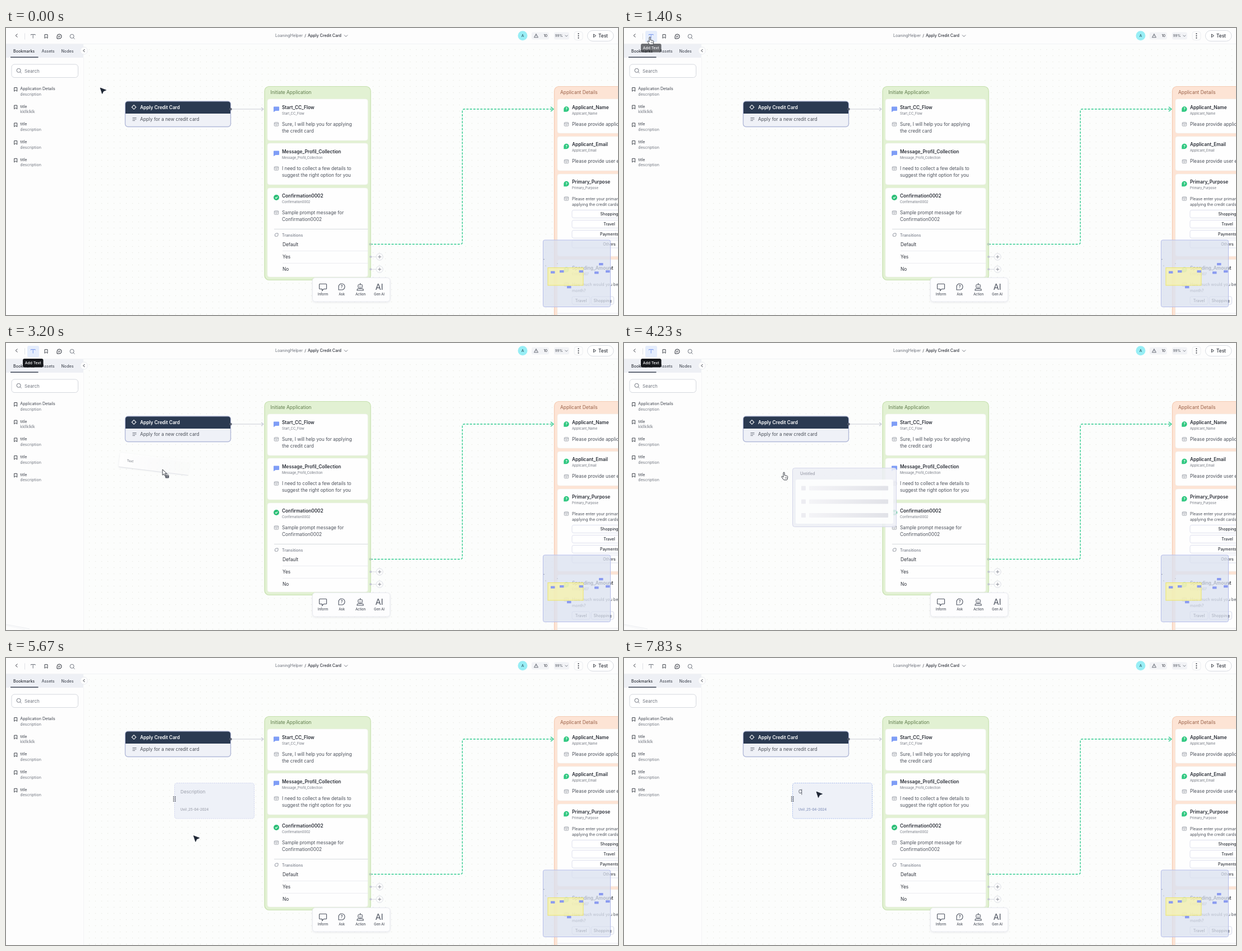
An HTML page for the animation above (8000 ms loop, 1091 by 513 pixels).

```html
<!DOCTYPE html>
<html lang="en">
<head>
<meta charset="utf-8">
<title>Flow builder</title>
<style>
  html, body { margin: 0; width: 100%; height: 100%; overflow: hidden; background: #fcfdfc; }
  svg { display: block; width: 100vw; height: 100vh; font-family: Inter, Roboto, sans-serif; }
  text { white-space: pre; }
</style>
</head>
<body>
<svg id="stage" viewBox="0 0 1091 513" fill="none"></svg>
<script>
const LOOP = 8000;
const stage = document.getElementById('stage');
const INK = '#2b2f38', BODY = '#4b505a', SOFT = '#70757f';

// Markup helpers; text is placed by the middle of its capitals.
const txt = (x, y, s, size = 8.25, fill = BODY, weight = 400, anchor = 'start') =>
  `<text x="${x}" y="${y + size * 0.36}" font-size="${size}" fill="${fill}" font-weight="${weight}" text-anchor="${anchor}">${s}</text>`;
const box = (x, y, w, h, r, fill, stroke = 'none', extra = '') =>
  `<rect x="${x}" y="${y}" width="${w}" height="${h}" rx="${r}" fill="${fill}" stroke="${stroke}" ${extra}/>`;
const line = (d, stroke = INK, width = 1, extra = '') =>
  `<path d="${d}" stroke="${stroke}" stroke-width="${width}" ${extra}/>`;
const dot = (x, y, r, fill, stroke = 'none') =>
  `<circle cx="${x}" cy="${y}" r="${r}" fill="${fill}" stroke="${stroke}"/>`;
const at = (x, y, s) => `<g transform="translate(${x} ${y})">${s}</g>`;
const group = (id, s) => `<g id="${id}">${s}</g>`;

const bookmark = (x, y) => line(`M${x - 2.5} ${y - 3.3}h5v6.6l-2.5 -2l-2.5 2z`, INK, 0.9, 'stroke-linejoin="round"');
const lens = (x, y) => line(`M${x + 2.2} ${y + 2.2}l2.3 2.3`, SOFT) +
  `<circle cx="${x - 0.4}" cy="${y - 0.4}" r="3.5" stroke="${SOFT}"/>`;
const bubble = (x, y, c, fill = 'none') =>
  `<path d="M${x - 4} ${y + 4}v-4a4 4 0 1 1 4 4z" stroke="${c}" fill="${fill}" stroke-linejoin="round"/>`;
const promptIcon = (x, y) => box(x - 3.7, y - 3.2, 7.4, 6.4, 1, 'none', '#8d929c', 'stroke-width=".8"') +
  line(`M${x - 3.7} ${y - 1.2}h7.4M${x - 2} ${y + 1}h4`, '#8d929c', 0.8);
const messageIcon = (x, y) =>
  `<path d="M${x - 4} ${y - 4.5}h8q1 0 1 1v5.5q0 1-1 1h-5.5l-3.5 2.2v-9q0-.7 1-.7z" fill="#7f9df6"/>`;
const askIcon = (x, y) =>
  `<path d="M${x - 4.7} ${y + 4.7}v-4.7a4.7 4.7 0 1 1 4.7 4.7z" fill="#2dc77f"/>` + txt(x, y, '?', 6.5, '#fff', 700, 'middle');
const checkIcon = (x, y) => dot(x, y, 5, '#2dbf78') + line(`M${x - 2} ${y}l1.5 1.5l2.7-2.8`, '#fff', 1.1);
const card = (x, y, w, h) => box(x, y, w, h, 4, '#fefefe', '#f0f2ee', 'stroke-width=".6"');

const head = (x, y, name, icon, sub = name) =>
  icon(x - 10, y + 3) + txt(x, y, name, 8.25, INK, 600) + txt(x, y + 10.7, sub, 5.85, SOFT);
const prompt = (x, y, lines, size = 8.25, gap = 12.4) =>
  promptIcon(x - 10, y) + lines.map((s, i) => txt(x, y + i * gap, s, size)).join('');

function canvasLayer() {
  const plus = y => line(`M650 ${y}h10`, '#d3d6dd', 0.9) + dot(650, y, 2, '#c3c7cf') +
    dot(666, y, 6, '#fdfdfd', '#dcdfe5') + line(`M663 ${y}h6M666 ${y - 3}v6`, '#80858f', 0.9);
  const option = (y, s) => box(1009, y - 7, 133, 14, 3, '#fff', '#d6d9ea', 'stroke-width=".8"') +
    txt(1075.5, y, s, 7, INK, 500, 'middle');

  const start = box(212.5, 131, 188, 45.5, 5, '#eff1f7', '#b3bad9', 'stroke-width="1.4"') +
    '<path d="M213 153v-17q0-4.5 4.5-4.5h178q4.5 0 4.5 4.5v17z" fill="#2b3a51"/>' +
    `<circle cx="228" cy="141.5" r="3" stroke="#fff"/>` +
    line('M228 137v2M228 144v2M223.500 141.500h2M230.500 141.500h2', '#fff') +
    txt(239, 142, 'Apply Credit Card', 8.25, '#fff', 600) +
    line('M225.500 160.500h7M225.500 163h7M225.500 165.500h4.500', '#6a707c', 0.9) +
    txt(239, 163.500, 'Apply for a new credit card') +
    line('M401 145h58M455 142l4 3l-4 3', '#cbced8', 1.2) + dot(400.500, 145, 2.2, '#59606f');

  const first = box(461, 104.500, 189, 346, 8, '#e2f1d3', '#c5e0ad', 'stroke-width="1.2"') +
    txt(471.500, 114.500, 'Initiate Application', 8.4, '#5d7a4a') +
    card(466, 127, 179, 74) + card(466, 206, 179, 74) + card(466, 286, 179, 159) +
    head(492, 142, 'Start_CC_Flow', messageIcon) +
    prompt(492, 172, ['Sure, I will help you for applying', 'the credit card']) +
    head(492, 221, 'Message_Profil_Collection', messageIcon) +
    prompt(492, 251, ['I need to collect a few details to', 'suggest the right option for you']) +
    head(492, 300, 'Confirmation0002', checkIcon) +
    prompt(492, 330, ['Sample prompt message for', 'Confirmation0002']) +
    line('M478 359.500h167', '#d3d6db', 0.9) +
    line('M479.500 372v-3a2.500 2.500 0 0 1 2.500-2h3v3a2.500 2.500 0 0 1-2.500 2.500z', '#8a8f9a', 0.9) +
    txt(492, 370, 'Transitions', 6.95, '#878c97', 600) +
    txt(493, 387, 'Default', 8.25, INK) + txt(493, 409, 'Yes', 8.25, INK) + txt(493, 431.300, 'No', 8.25, INK) +
    line('M493 398.500h152M493 420.500h152', '#e6e8ed', 0.8);

  const second = box(977.500, 104.500, 190, 430, 8, '#fde4d5', '#f5cbb3', 'stroke-width="1.2"') +
    txt(988, 114.500, 'Applicant Details', 8.4, '#9a6148') +
    card(983, 127, 179, 61) + card(983, 194, 179, 61) + card(983, 261, 179, 147) + card(983, 414, 179, 110) +
    head(1009, 142, 'Applicant_Name', askIcon) + prompt(1009, 172, ['Please provide applicant name']) +
    head(1009, 208.500, 'Applicant_Email', askIcon) + prompt(1009, 238.500, ['Please provide user email']) +
    head(1009, 275.500, 'Primary_Purpose', askIcon) +
    prompt(1009, 305, ['Please enter your primary purpose of', 'applying the credit cards'], 7.05, 10.6) +
    option(332.500, 'Shopping') + option(350.500, 'Travel') + option(368.500, 'Payments') + option(386, 'Others') +
    head(1009, 429, 'Spending_Amount', askIcon, 'Entity0007') +
    prompt(1009, 458.500, ['How much would you be spending per', 'month?'], 7.05, 10.5) +
    box(1009, 480, 32, 14, 3, '#fff', '#d6d9ea') + txt(1025, 487, 'Travel', 7, INK, 500, 'middle') +
    box(1043.500, 480, 40, 14, 3, '#fff', '#d6d9ea') + txt(1063.500, 487, 'Shopping', 7, INK, 500, 'middle') +
    line('M983 510h108', '#e1e3e8', 0.8);

  const link = line('M650 386.500H810q3.500 0 3.500-3.500V148.500q0-3.500 3.500-3.500H975', '#2fca8e', 1.4, 'stroke-dasharray="4 2.200"') +
    line('M971 141l5 4l-5 4', '#2fca8e', 1.4) + dot(649.500, 386.500, 2.2, '#b9cdbb');

  return start + first + second + link + plus(409) + plus(431.300);
}

function overlayLayer() {
  const spots = [[971, 434.500], [987, 433], [1021.500, 433], [1049, 435.300], [1057, 420], [1069, 433], [1000, 461]];
  const minimap = box(957.500, 379, 120, 119.500, 3, 'rgba(219,225,240,.76)', '#b5bdea') +
    box(966, 428.500, 63, 31.500, 0, 'rgba(250,244,165,.7)', '#ece56a') +
    spots.map(([x, y]) => box(x, y, 7.5, 4.2, 0.5, '#8b9bf0')).join('') +
    dot(959, 413.500, 0.8, '#8f97aa') + dot(962, 425, 0.6, '#8f97aa') + dot(983, 421, 0.6, '#8f97aa');

  const label = (x, s) => txt(x, 476, s, 5.9, BODY, 500, 'middle');
  const tools = box(546.500, 446.500, 138, 42.500, 5, '#fdfdfe', '#e9ebf0', 'filter="url(#shade)"') +
    line('M559.500 457.500h11q1 0 1 1v7q0 1-1 1h-4l-3 3v-3h-4q-1 0-1-1v-7q0-1 1-1z', '#4d5360', 1.1) +
    line('M593 468v-5a5.500 5.500 0 1 1 5.500 5z', '#4d5360', 1.1) + txt(598.500, 462.700, '?', 7.5, '#4d5360', 600, 'middle') +
    box(627.500, 458.500, 8, 6, 2, 'none', '#4d5360') + line('M631.500 456v2.500M626 469v-1q0-2 2-2h7q2 0 2 2v1z', '#4d5360', 1.1) +
    dot(630, 461.500, 0.8, '#4d5360') + dot(633, 461.500, 0.8, '#4d5360') +
    txt(665.500, 462.500, 'AI', 14.500, '#4d5360', 400, 'middle') +
    label(565, 'Inform') + label(598.500, 'Ask') + label(632, 'Action') + label(665.500, 'Gen AI');
  return minimap + tools;
}

function sidebar() {
  const rows = [['Application Details', 'description'], ['title', 'kkllklklk'],
    ['title', 'description'], ['title', 'description'], ['title', 'description']];
  return box(0, 28, 138, 485, 0, '#fdfdfd') + line('M138.500 53V513', '#f0f1f3', 0.8) +
    box(0, 29, 138, 24, 0, '#eef0f5') +
    txt(13, 41.300, 'Bookmarks', 7.1, INK, 500) + txt(63.500, 41.300, 'Assets', 7.1, BODY, 500) +
    txt(98.500, 41.300, 'Nodes', 7.1, BODY, 500) + line('M8 52.300h49.500', '#3a4252', 1.6) +
    dot(139, 40.500, 6.5, '#fdfdfd', '#eceef2') + line('M140.300 38l-2.500 2.500l2.500 2.500', INK, 1) +
    box(10, 65, 118.500, 23.500, 5, '#fff', '#d5d8de') + lens(23, 76.300) + txt(33, 76.600, 'Search', 8.1, SOFT) +
    rows.map(([a, b], i) => {
      const y = 108.300 + i * 31.700;
      return bookmark(17.200, y + 1.500) + txt(25.300, y, a, 7.1, '#3c414b') + txt(25.300, y + 9.700, b, 7.1, SOFT);
    }).join('');
}

function topBar() {
  return box(0, 0, 1091, 28, 0, '#fdfdfd') + line('M0 28.500H1091', '#eff0f3', 0.8) +
    line('M20.300 10.500l-3 3l3 3', INK) + line('M33.500 9.500v11', '#dfe1e6') +
    group('textHot', box(38, 5, 21, 20.500, 3, '#e5edfc')) +
    '<path id="tee" d="M44.500 13v-1.500h7.500v1.500M48.200 11.500v7" stroke-width="1"/>' +
    bookmark(71.500, 15) + bubble(95, 15, INK) + line('M93 14.500h4M93 16.300h2.500', INK, 0.8) +
    group('commentHot', box(84, 5, 21.500, 20.500, 3, '#e2ebfd') + bubble(95, 15, '#2f63e6', '#2f63e6') + line('M93.200 15h3.600M95 13.200v3.600', '#fff', 0.9)) +
    lens(118, 15.200) +
    txt(529, 13.700, 'LoaningHelper', 7.1, '#666b75', 400, 'end') + txt(533.500, 13.700, '/', 7.1, INK, 400, 'middle') +
    txt(538, 13.700, 'Apply Credit Card', 7.05, INK, 500) + line('M603 12.500l3 3l3-3', SOFT) +
    dot(921, 13.800, 8.500, '#97eef5') + txt(921, 14, 'A', 6.500, '#2c5661', 500, 'middle') +
    box(937, 7.500, 31, 13, 3, '#f2f3f6') + line('M945 10.500l3.500 6.300h-7zM945 12.700v1.800', '#5b606b', 0.9) +
    txt(958.500, 14, '10', 6.400, INK) +
    box(977, 7.500, 27, 13, 3, '#f2f3f6') + txt(978.700, 14, '99%', 6.300, BODY) + line('M996.500 12.700l2.500 2.500l2.500-2.500', SOFT, 0.9) +
    box(1013, 6.500, 15, 15, 4, '#fdfdfd', '#eceef1') + [10.300, 14, 17.700].map(y => dot(1020.500, y, 1, INK)).join('') +
    box(1036.500, 4.500, 46.500, 19, 9.500, '#fff', '#d9dce2') + line('M1047.500 11l4 2.800l-4 2.800z', INK, 0.9) +
    txt(1056, 14, 'Test', 8.300, INK, 500);
}

const tip = (id, x, w, s) => group(id, box(x, 28, w, 15.500, 3, '#15171b') + txt(x + w / 2, 35.800, s, 6.75, '#fff', 500, 'middle'));

function movingLayer() {
  const bar = y => box(316, y, 8, 8, 1, '#ededf2') + box(330, y, 141, 8, 1, 'url(#bar)');
  const skeleton = box(300.500, 223.500, 185, 105, 4, 'rgba(238,239,246,.86)', '#d5d7ea') +
    txt(314, 233.300, 'Untitled', 7.1, '#9b9eaa', 500) + box(306, 244, 174, 79, 3, 'rgba(254,254,254,.9)') +
    bar(255.500) + bar(279.500) + bar(304);
  const grip = [248.500, 252, 255.500].map(y => dot(298.700, y, 0.9, INK) + dot(301.700, y, 0.9, INK)).join('');
  const note = '<rect id="noteBox" x="300.500" y="223.500" width="142" height="63.500" rx="4" fill="#eef1f8" stroke-dasharray="2 1.500"/>' +
    grip + group('hint', txt(311, 239.500, 'Description', 8.200, '#9a9eaa')) +
    group('typed', txt(311, 239.500, 'C', 8.250, BODY)) + '<path id="caret" stroke="#3c414b" stroke-width=".8"/>' +
    group('date', txt(311, 271, 'Uvil ,25-04-2024', 5.950, 'currentColor', 600));
  const ghost = '<g transform="translate(-75 -30) rotate(7)">' +
    box(0, 0, 124, 25, 2, 'url(#sheet)', 'none', 'filter="url(#shade)"') +
    line('M0 25.500h124', '#dfe1e6', 0.9) + txt(13, 12.500, 'Text', 5.900, SOFT) + '</g>';
  const arrow = '<path d="M0 0L10.500 4L5.700 6L3.500 10.600Z" fill="#1f2735" stroke="#1f2735" stroke-width=".8" stroke-linejoin="round"/>';
  const hand = '<path d="M-1 1.200a1.100 1.100 0 0 1 2.200 0v4.300l4.300 1q1.500 .5 1.300 2l-.6 4q-.2 1.300-1.500 1.300h-4q-1 0-1.600-.9l-3-4.200q-.6-1 .3-1.400q1-.3 1.600 .6l1 1z" fill="#fff" stroke="#23272f" stroke-width=".9" stroke-linejoin="round"/>' +
    line('M2.700 8.500v3M4.600 8.500v3', '#23272f', 0.6);
  const carry = '<path d="M0 0v10.200l2.400-2.200l1.700 3.700l1.800-.8l-1.700-3.600h3.300z" fill="#fff" stroke="#2b2f38" stroke-width=".9"/>' +
    box(5, 10.500, 6.500, 5, 1, '#565b66') + line('M6.500 10.500v-1.200q0-1.300 1.700-1.300t1.700 1.300v1.200', '#565b66', 0.9) + dot(8.200, 13, 0.8, '#fff');
  return group('stray', line('M0 503L42 511', '#eceef1', 1.200) + line('M0 505L34 512', '#f3f4f6', 1.200)) +
    group('skeleton', skeleton) + group('note', note) +
    tip('commentTip', 67, 55.500, 'Add Comment') + tip('textTip', 30, 36.500, 'Add Text') +
    group('cursor', group('ghost', ghost) + group('arrow', arrow) + group('hand', hand) + group('carry', carry));
}

stage.innerHTML = `<defs>
  <pattern id="grid" width="11" height="11" patternUnits="userSpaceOnUse"><circle cx="5.500" cy="5.500" r=".75" fill="#e9eae3"/></pattern>
  <linearGradient id="bar"><stop stop-color="#f4f4f7"/><stop offset="1" stop-color="#e1e2e8"/></linearGradient>
  <linearGradient id="sheet"><stop stop-color="#fff" stop-opacity=".95"/><stop offset="1" stop-color="#fff" stop-opacity=".4"/></linearGradient>
  <filter id="shade" x="-10%" y="-30%" width="120%" height="170%"><feDropShadow dx="0" dy="1" stdDeviation="1.500" flood-color="#444b60" flood-opacity=".13"/></filter>
</defs>` + box(0, 0, 1091, 513, 0, '#fcfdfc') + box(139, 29, 952, 484, 0, 'url(#grid)') +
  canvasLayer() + overlayLayer() + sidebar() + topBar() + movingLayer();

const el = {};
stage.querySelectorAll('[id]').forEach(n => el[n.id] = n);

// Pointer tip: time, x, y
const PATH = [
  [0, 168, 107], [470, 168, 107], [640, 96, 17], [700, 90, 14], [800, 24, 17], [900, 15, 9], [1030, 18, 10], [1270, 46, 16],
  [1870, 46, 16], [2230, 186, 197], [2670, 246, 221], [2900, 246, 221], [3200, 279, 226], [3700, 285, 231],
  [4570, 285, 231], [5370, 325, 296], [5670, 334, 317.500], [5790, 380, 336], [5900, 475, 300], [6030, 432, 239],
  [6170, 432, 239], [6500, 338, 238], [7770, 338, 238], [7830, 343, 239], [LOOP, 343, 239]
];

function pointer(t) {
  const i = Math.max(1, PATH.findIndex(p => p[0] > t));
  const [t0, x0, y0] = PATH[i - 1], [t1, x1, y1] = PATH[i];
  const k = (t - t0) / (t1 - t0);
  return [x0 + (x1 - x0) * k, y0 + (y1 - y0) * k];
}

const clamp = v => Math.min(1, Math.max(0, v));
const show = (id, v) => el[id].setAttribute('opacity', +v);

function draw(t) {
  const during = (a, b) => t >= a && t < b;
  const [x, y] = pointer(t);
  el.cursor.setAttribute('transform', `translate(${x} ${y})`);

  const dragging = during(1870, 3730);
  const hand = during(600, 1870) || during(3730, 4640);
  show('carry', dragging);
  show('ghost', during(1900, 3730));
  show('hand', hand);
  show('arrow', !hand && !dragging);
  show('stray', during(1900, 4570));

  show('commentHot', during(630, 860));
  show('commentTip', Math.min(clamp((t - 640) / 80), clamp((880 - t) / 160)));
  const textHot = during(1200, 4700);
  show('textHot', textHot);
  el.tee.setAttribute('stroke', textHot ? '#7897ee' : SOFT);
  show('textTip', Math.min(clamp((t - 1300) / 170), clamp((4800 - t) / 130)));

  const focus = t >= 6000, typed = t >= 6700;
  show('skeleton', during(3770, 4750));
  show('note', t >= 4750);
  el.noteBox.setAttribute('stroke', focus ? '#a5b8ec' : '#cfd3ee');
  el.date.setAttribute('color', focus ? '#8d9ac0' : '#a4a7b2');
  show('hint', !focus);
  show('typed', typed);
  show('caret', during(6000, 7230) || t >= 7770);
  el.caret.setAttribute('d', `M${typed ? 316.800 : 311} 234.500v10`);
}

function tick() {
  draw(performance.now() % LOOP);
  requestAnimationFrame(tick);
}
draw(0);
tick();
</script>
</body>
</html>
```
